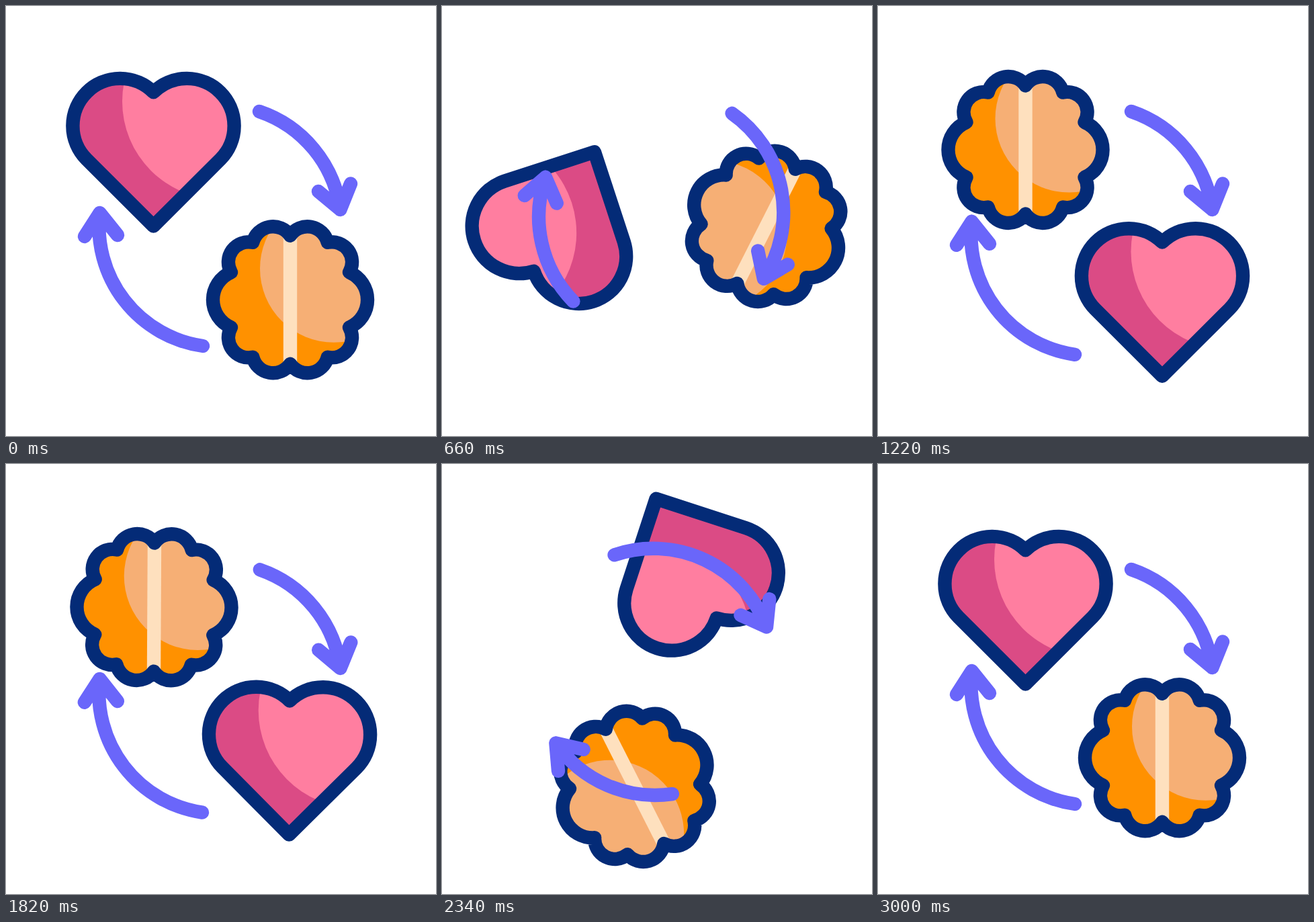
Animation, 640 px wide and 640 px high, one loop 3.62 s. Source, as an HTML page:

```html
<!DOCTYPE html>
<html lang="en">
<head>
<meta charset="utf-8">
<title>Heart and mind swap</title>
<style>
  html, body { margin: 0; width: 100%; height: 100%; overflow: hidden; background: #fff; }
  svg { display: block; width: 100vw; height: 100vh; }
  .line { fill: none; stroke-width: 20.4; stroke-linecap: round; stroke-linejoin: round; }
  .navy { stroke: #042b77; }
  .violet { stroke: #6a66fa; }
</style>
</head>
<body>
<svg viewBox="0 0 640 640">
  <defs>
    <path id="heartShape" d="M0-85.7A70.5 70.5 0 0 0-99.85 13.85L0 113.5L99.85 13.85A70.5 70.5 0 0 0 0-85.7Z"/>
    <path id="brainShape" d="M0-95.5A31 31 0 0 0-55.7-85.4A30 30 0 0 0-88-41A44.6 44.6 0 0 0-88 41
      A30 30 0 0 0-55.7 85.4A31 31 0 0 0 0 95.5A31 31 0 0 0 55.7 85.4A30 30 0 0 0 88 41
      A44.6 44.6 0 0 0 88-41A30 30 0 0 0 55.7-85.4A31 31 0 0 0 0-95.5Z"/>
    <clipPath id="heartClip"><use href="#heartShape"/></clipPath>
    <clipPath id="brainClip"><use href="#brainShape"/></clipPath>
  </defs>
  <g id="stage">
    <g id="heart">
      <use href="#heartShape" fill="#db4b85"/>
      <g clip-path="url(#heartClip)"><circle cx="99" cy="-72" r="145.5" fill="#ff7ea0"/></g>
      <use href="#heartShape" class="line navy"/>
    </g>
    <g id="brain">
      <use href="#brainShape" fill="#ff9100"/>
      <g clip-path="url(#brainClip)">
        <circle cx="65" cy="-46.5" r="110" fill="#f6af75"/>
        <rect x="-10.2" y="-100" width="20.4" height="200" fill="#fee0be"/>
      </g>
      <use href="#brainShape" class="line navy"/>
    </g>
    <!-- arrows use page coordinates, shifted to the pivot -->
    <path class="line violet" transform="translate(-320 -320)"
      d="M377 157A180 180 0 0 1 497.5 303M465 276L497.5 303L513 264.5"/>
    <path id="lowerArrow" class="line violet"
      d="M293 506A180 180 0 0 1 139.5 308M117 343L139.5 308L166 341"/>
  </g>
</svg>
<script>
  const LOOP = 3620, MOVE = 1200, SECOND = 1800, STEP = 20;
  const TOP = [-100.5, -106], BOTTOM = [103, 117.3];
  const ARROW_SHIFT = 12.8;

  // Curve handles: [along, across] the chord, from its start and from its end.
  const SWAPS = [
    { heart: [TOP, BOTTOM, [41, 203], [-27, 186]], brain: [BOTTOM, TOP, [39, 238], [24, 184]] },
    { heart: [BOTTOM, TOP, [51, 249], [15, 212]], brain: [TOP, BOTTOM, [14, 225], [-10, 222]] }
  ];

  const byId = id => document.getElementById(id);
  const stage = byId('stage'), lowerArrow = byId('lowerArrow');
  const place = (el, x, y) => el.setAttribute('transform', `translate(${x} ${y})`);

  function pointOn([from, to, out, into], s) {
    const dx = to[0] - from[0], dy = to[1] - from[1], length = Math.hypot(dx, dy);
    const near = 3 * s * (1 - s) ** 2, far = 3 * s * s * (1 - s);
    const along = (length * (far + s ** 3) + near * out[0] + far * into[0]) / length;
    const across = (near * out[1] + far * into[1]) / length;
    return [from[0] + dx * along + dy * across, from[1] + dy * along - dx * across];
  }

  function draw(time) {
    const back = time >= SECOND;
    const t = Math.min((back ? time - SECOND : time) / MOVE, 1);
    const s = t * t * (3 - 2 * t);
    const swap = SWAPS[back ? 1 : 0];
    stage.setAttribute('transform', `translate(320 320) rotate(${360 * s})`);
    place(byId('heart'), ...pointOn(swap.heart, s));
    place(byId('brain'), ...pointOn(swap.brain, s));
    place(lowerArrow, -320, -320 + ARROW_SHIFT * (back ? 1 - s : s));
  }

  const start = performance.now();
  function tick() {
    const time = (performance.now() - start) % LOOP;
    draw(Math.floor(time / STEP) * STEP);
    requestAnimationFrame(tick);
  }
  draw(0);
  requestAnimationFrame(tick);
</script>
</body>
</html>
```
